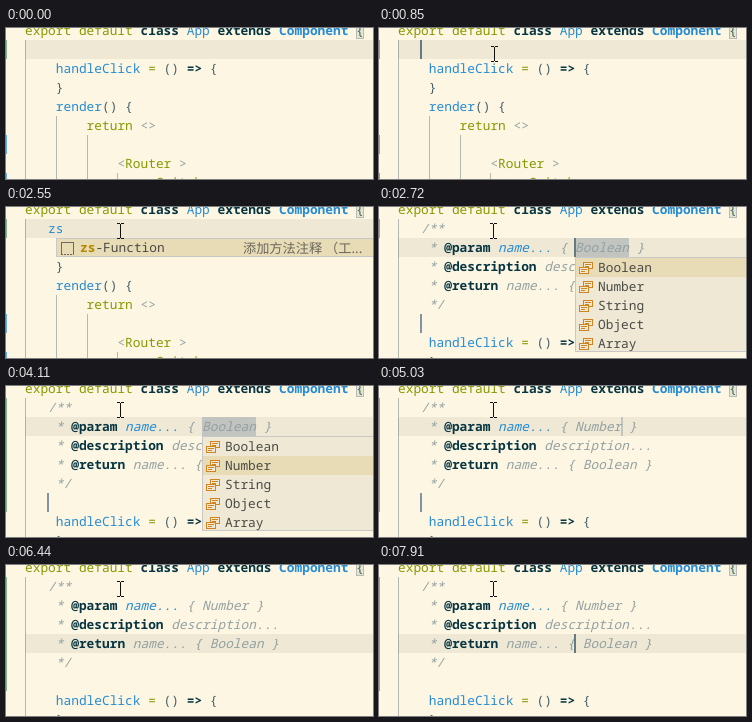
An HTML page with a canvas that plays this animation: 367x151 px, repeating every 8000 ms.

```html
<!DOCTYPE html>
<html lang="en">
<head>
<meta charset="utf-8">
<title>Snippet completion in a code editor</title>
<style>
html, body { margin: 0; overflow: hidden; background: #fdf6e3; }
canvas { display: block; }
</style>
</head>
<body>
<canvas id="stage" width="367" height="151"></canvas>
<script>
const ctx = document.getElementById('stage').getContext('2d');
const LOOP = 8000, LEFT = 19, CHAR = 7.7, LINE = 19;
const MONO = '12.833px "Noto Sans Mono", monospace';
const STYLES = {
  plain: ['#46606a', ''],
  key: ['#859900', ''],
  store: ['#073642', 'bold '],
  base: ['#268bd2', 'bold '],
  name: ['#268bd2', ''],
  tag: ['#93a1a1', ''],
  note: ['#93a1a1', 'italic '],
  arg: ['#268bd2', 'italic '],
  item: ['#4b4b45', ''],
  match: ['#b58900', 'bold ']
};
const colX = col => Math.round(LEFT + col * CHAR);
const rowY = row => row * LINE - 7;

function rect(x, y, w, h, color) {
  ctx.fillStyle = color;
  ctx.fillRect(x, y, w, h);
}

function frame(x, y, w, h, color) {
  ctx.strokeStyle = color;
  ctx.lineWidth = 1;
  ctx.strokeRect(x + .5, y + .5, w - 1, h - 1);
}

// tokens: style, text, style, text ...
function write(x, y, tokens) {
  for (let i = 0; i < tokens.length; i += 2) {
    const [color, face] = STYLES[tokens[i]];
    ctx.font = face + MONO;
    ctx.fillStyle = color;
    ctx.fillText(tokens[i + 1], x, y + 14);
    x += tokens[i + 1].length * CHAR;
  }
}

function codeLine(row, indent, tokens = [], start = indent) {
  for (let col = 0; col < indent; col += 4)
    rect(colX(col), rowY(row), 1, LINE, 'rgba(88,110,117,.45)');
  write(LEFT + start * CHAR, rowY(row), tokens);
}

const HEADER = ['key', 'export default ', 'store', 'class ', 'name', 'App ',
  'store', 'extends ', 'base', 'Component ', 'plain', '{'];
const BODY = [
  [4, ['name', 'handleClick ', 'key', '= ', 'plain', '() ', 'store', '=> ', 'plain', '{']],
  [4, ['plain', '}']],
  [4, ['name', 'render', 'plain', '() {']],
  [8, ['key', 'return ', 'tag', '<>']],
  [12],
  [12, ['tag', '<', 'key', 'Router ', 'tag', '>']],
  [16, ['tag', '<', 'key', 'Switch', 'tag', '>']]
];

function docComment(type) {
  const field = (tag, ...rest) => ['note', '* ', 'store', tag + ' ', ...rest];
  codeLine(1, 4, ['note', '/**'], 3);
  codeLine(2, 4, field('@param', 'arg', 'name... ', 'note', `{ ${type} }`));
  codeLine(3, 4, field('@description', 'note', 'description...'));
  codeLine(4, 4, field('@return', 'note', 'name... { Boolean }'));
  codeLine(5, 4, ['note', '*/']);
  codeLine(6, 4);
}

function caret(row, col) {
  rect(Math.floor(LEFT + col * CHAR) - 1, rowY(row), 2, LINE, '#657b83');
}

function placeholder(row, col, width) {
  rect(colX(col), rowY(row), width, LINE, 'rgba(10,50,100,.2)');
}

function panel(x, y, count, selected) {
  const height = count * LINE, top = 1 + selected * LINE;
  rect(x, y, 400, height, '#eee8d5');
  rect(x, y + top, 400, Math.min(LINE, height - top), '#e8dcb6');
  frame(x, y, 400, height, '#c8c8c8');
}

function enumIcon(x, y) {
  const color = '#cf8420';
  for (const [dx, dy] of [[4, 0], [0, 5]]) {
    rect(x + dx, y + dy, 10, 7, '#eee8d5');
    frame(x + dx, y + dy, 10, 7, color);
    rect(x + dx + 2, y + dy + 2, 6, 1, color);
    rect(x + dx + 2, y + dy + 4, 4, 1, color);
  }
}

function typeMenu(x, y, selected) {
  const names = ['Boolean', 'Number', 'String', 'Object', 'Array'];
  panel(x, y, names.length, selected);
  names.forEach((name, i) => {
    const top = y + 1 + i * LINE;
    enumIcon(x + 4, top + 4);
    write(x + 23, top, ['item', name]);
  });
}

function snippetMenu(typed) {
  panel(50, 31, 1, 0);
  frame(55, 35, 13, 13, '#6b6b62');
  for (let x = 57; x < 67; x += 3) rect(x, 47, 1, 1, '#e8dcb6');
  write(74, 31, ['match', typed, 'item', 'zs-Function'.slice(typed.length)]);
  ctx.font = '13.2px "Noto Sans CJK SC", "Noto Sans CJK", sans-serif';
  ctx.fillStyle = '#6a675c';
  ctx.fillText('添加方法注释 （工...', 237, 46);
}

function mouse(t) {
  if (t < 70) return;
  let x = 115, y = 26;
  if (t < 610) {
    const rest = (1 - Math.floor((t - 70) / 77) / 7) ** 2;
    x += Math.round(63 * rest);
    y += Math.round(80 * rest);
  } else if (t >= 760 && t < 850) {
    x = 121; y = 29;
  } else if (t >= 1220) {
    x = 114; y = 24;
  }
  rect(x, y - 7, 1, 14, '#111');
  for (const edge of [y - 8, y + 7]) {
    rect(x - 3, edge, 3, 1, '#111');
    rect(x + 1, edge, 3, 1, '#111');
  }
}

// Caret switches on and off at these alternating times.
const BLINKS = [760, 1220, 1470, 1940, 2170, 2550, 2720, 3100, 3650, 4110,
  4570, 5030, 5490, 6440, 6900, 7430, 7910];
const caretOn = t => BLINKS.filter(time => time <= t).length % 2 === 1;

function draw(t) {
  const inserted = t >= 2720, picked = t >= 4570, onReturn = t >= 5660, done = t >= 5960;
  const typed = t < 1470 || inserted ? '' : t < 2170 ? 'z' : 'zs';
  const row = !inserted ? 1 : onReturn ? 4 : 2;
  const col = !inserted ? 3 + typed.length : onReturn && !done ? 24 : picked && !onReturn ? 29 : 23;

  rect(0, 0, 367, 151, '#fdf6e3');
  rect(LEFT, rowY(row), 348, LINE, '#eee8d5');
  rect(0, rowY(1), 1, LINE * (t >= 2870 ? 6 : 1), '#81b88b');
  if (!inserted) {
    rect(0, rowY(6), 1, LINE, '#66afe0');
    rect(0, rowY(8), 1, LINE, '#66afe0');
  }

  rect(350, -6, 8, 17, 'rgba(0,100,0,.1)');
  frame(350, -6, 8, 17, '#b9b9b9');
  codeLine(0, 0, HEADER);

  if (inserted && !done) {
    if (!picked) placeholder(2, 23, 7 * CHAR);
    else placeholder(2, 29, 2);
    if (onReturn) placeholder(4, 24, 7 * CHAR);
    rect(41, rowY(6), 2, LINE, 'rgba(10,50,100,.5)');
  }
  if (inserted) docComment(picked ? 'Number' : 'Boolean');
  else codeLine(1, 4, [t < 1770 ? 'plain' : 'name', typed], 3);
  BODY.forEach(([indent, tokens], i) => codeLine(i + (inserted ? 7 : 2), indent, tokens));

  if (caretOn(t)) caret(row, col);
  if (t >= 1540 && !inserted) snippetMenu(typed);
  if (inserted && !picked) typeMenu(colX(23), rowY(3), t < 4110 ? 0 : 1);
  if (onReturn && !done) typeMenu(colX(24), rowY(5), 1);
  mouse(t);
}

ctx.textRendering = 'geometricPrecision';
const begin = performance.now();
function tick() {
  draw((performance.now() - begin) % LOOP);
  requestAnimationFrame(tick);
}
tick();
</script>
</body>
</html>
```
